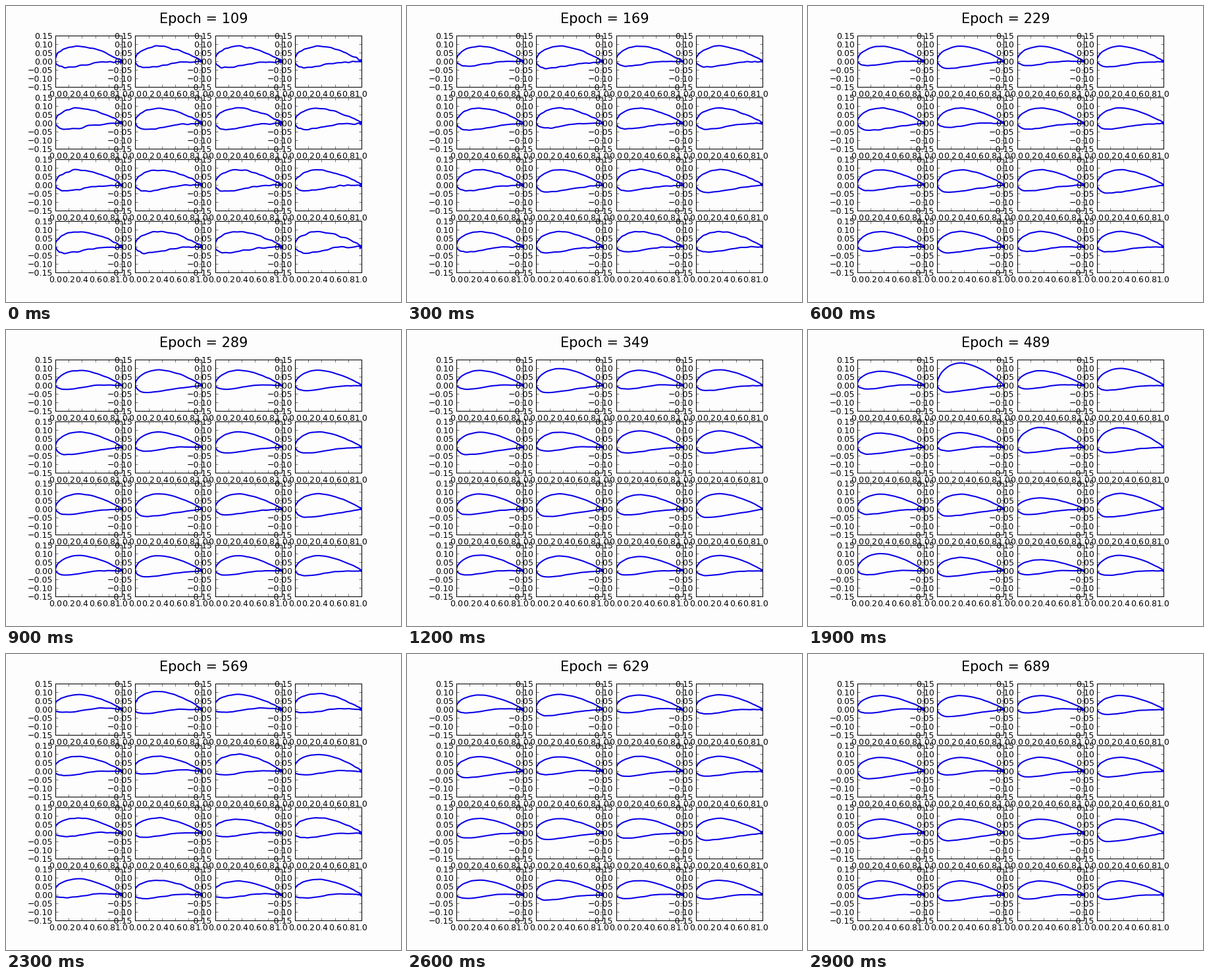
A matplotlib script for the animation above (3 s loop, 600x450 px).

```python
import numpy as np
import matplotlib.pyplot as plt
from matplotlib.animation import FuncAnimation

W, H, DPI = 600, 450, 75
FRAMES, STEP_MS = 30, 100
BG, INK, BLUE = "#fdfdfe", "#000000", "#0a00e8"

plt.rcParams.update({
    "font.family": "DejaVu Sans", "font.size": 12, "text.kerning_factor": 6,
    "axes.linewidth": 1.0, "axes.facecolor": BG,
    "xtick.direction": "in", "ytick.direction": "in",
    "xtick.top": True, "ytick.right": True,
    "xtick.major.size": 4, "ytick.major.size": 4,
    "xtick.major.width": 0.5, "ytick.major.width": 0.5,
    "xtick.major.pad": 4.8, "ytick.major.pad": 4,
})

# Two traits per foil, in 1/1000 chord: growth of the top at its widest, belly depth.
SWELL = [-6, 44, -3, 11, -6, -4, 28, 26, -3, -3, -25, 1, 12, -12, -25, 1]
DEPTH = [22, 42, 21, 30, 44, 22, 34, 34, 33, 45, 35, 50, 24, 36, 25, 28]
MEAN_DEPTH = 33
PEAK_X, BELLY_X, AFT_X = 0.36, 0.15, 0.7

X = (1 - np.cos(np.linspace(0, np.pi, 56))) / 2


def bump(i, center, width):
    return np.exp(-((i - center) / width) ** 2 / 2)


def nose(t):
    t = np.minimum(t, 1)
    return (1 - (1 - t) ** 2) ** 0.56


def hermite(x, x0, x1, y0, y1, m0, m1):
    h = x1 - x0
    t = (x - x0) / h
    return ((2 * t**3 - 3 * t**2 + 1) * y0 + (t**3 - 2 * t**2 + t) * h * m0
            + (3 * t**2 - 2 * t**3) * y1 + (t**3 - t**2) * h * m1)


def upper(x, peak, start, end):
    front = start + (peak - start) * nose(x / PEAK_X)
    s = np.clip((x - PEAK_X) / (1 - PEAK_X), 0, 1)
    return np.where(x < PEAK_X, front, peak + (end - peak) * s**1.65)


def lower(x, dip, aft, start, end):
    s1, s2 = (aft - dip) / (AFT_X - BELLY_X), (end - aft) / (1 - AFT_X)
    slope = 2 * s1 * s2 / (s1 + s2) if s1 * s2 > 0 else 0
    front = start + (dip - start) * nose(x / BELLY_X)
    mid = hermite(x, BELLY_X, AFT_X, dip, aft, 0, slope)
    back = hermite(x, AFT_X, 1, aft, end, slope, s2)
    return np.where(x < BELLY_X, front, np.where(x < AFT_X, mid, back))


def foil(i, k):
    """Outline of foil k at step i, from the tail over the nose to the tail."""
    rng = np.random.default_rng(1000 * i + k)
    early = np.exp(-i / 4)        # untrained, noisy start
    swell = bump(i, 18, 3.5)      # foils differ most
    relapse = bump(i, 23, 2)      # thin bellies, open noses
    late = np.clip((i - 23) / 6, 0, 1)

    peak = 88 - 8 * late + SWELL[k] * swell
    spread = 1 - early - 0.6 * relapse
    depth = MEAN_DEPTH + 3 * early - 12 * relapse + spread * (DEPTH[k] - MEAN_DEPTH)
    aft = 22 - 0.9 * depth + 5 * early
    blunt = 8 * early + 26 * relapse + 5 * late

    up = upper(X, peak, 5 + blunt, 3)
    low = lower(X, -depth, aft, 4 - blunt / 2, -1)
    x = np.concatenate([X[::-1], X])
    y = np.concatenate([up[::-1], low])

    noise = np.convolve(rng.normal(size=len(x)), [0.25, 0.5, 0.5, 0.25], "same")
    y = y + (0.6 + 2 * early + 0.5 * relapse) * noise
    tangle = 3 + 5 * early + 4 * relapse + 3 * late
    tail = np.r_[0:5, len(x) - 5:len(x)]
    y[tail] += tangle * rng.uniform(-1, 0.6, len(tail))
    x[tail] -= tangle * 0.002 * rng.random(len(tail))
    return x, y / 1000


fig, axes = plt.subplots(4, 4, figsize=(W / DPI, H / DPI), dpi=DPI, facecolor=BG)
fig.subplots_adjust(left=0.125, right=0.9, bottom=0.1, top=0.9, wspace=0.2, hspace=0.2)
title = fig.suptitle("", fontsize=20, y=0.978, color=INK)

lines = []
for ax in axes.flat:
    ax.set(xlim=(0, 1), ylim=(-0.15, 0.15))
    ax.set_xticks(np.arange(6) / 5)
    ax.set_yticks(np.arange(-3, 4) / 20)
    lines += ax.plot([], [], color=BLUE, lw=2)


def update(i):
    title.set_text(f"Epoch = {109 + 20 * i}")
    for k, line in enumerate(lines):
        line.set_data(*foil(i, k))
    return [title, *lines]


anim = FuncAnimation(fig, update, frames=FRAMES, interval=STEP_MS,
                     init_func=lambda: update(0), repeat=True, repeat_delay=0)
plt.show()
```
